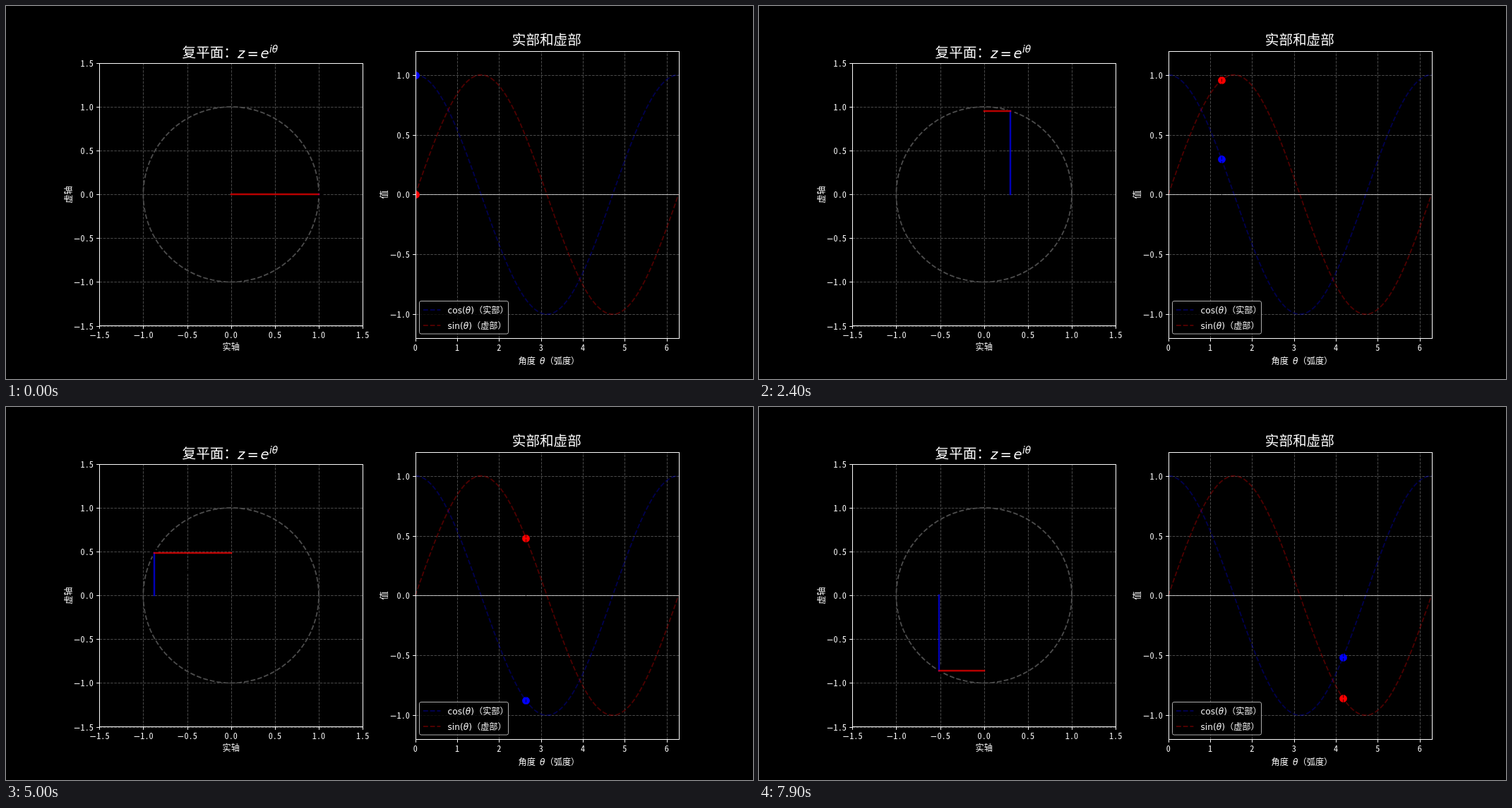
These frames come from a looping animation (1058 px wide and 529 px high, 8 s). An HTML page:

```html
<!DOCTYPE html>
<html lang="zh-CN">
<head>
<meta charset="utf-8">
<title>复平面</title>
<style>
  html, body { margin: 0; height: 100%; overflow: hidden; background: #000; }
  svg { display: block; width: 100%; height: 100%; }
  text {
    font: 12.2px "Noto Sans Mono CJK SC", "Noto Sans CJK SC", "Noto Sans CJK JP", "Noto Sans CJK", monospace;
    fill: #fff; text-spacing-trim: space-all;
  }
  .title { font-size: 19.6px; }
  .math { font-family: "DejaVu Sans", sans-serif; }
  .var { font-family: "DejaVu Sans", sans-serif; font-style: italic; }
  .mid { text-anchor: middle; }
  .end { text-anchor: end; }
  path, line, rect { fill: none; }
  .curve { stroke-width: 1.84; stroke-dasharray: 6.8 2.94; }
  .cos { stroke: #00f; stroke-opacity: .3; }
  .sin { stroke: #f00; stroke-opacity: .3; }
  .grid { stroke: #4a4a4a; stroke-width: .98; stroke-dasharray: 3.63 1.57; }
  .frame { stroke: #fff; stroke-width: .98; }
  .leg { stroke-width: 2.45; stroke-opacity: .72; stroke-linecap: square; }
</style>
</head>
<body>
<svg viewBox="0 0 1058 529">
  <clipPath id="plotArea"><rect x="580" y="64" width="373" height="407"/></clipPath>
  <g id="back"></g>
  <g id="moving">
    <line id="vector" stroke="#000" stroke-width="2.45"/>
    <circle id="point" r="5.4"/>
    <line id="imagLine" class="leg" stroke="#00f"/>
    <line id="realLine" class="leg" stroke="#f00"/>
    <g clip-path="url(#plotArea)">
      <circle id="cosDot" r="5.4" fill="#00f"/>
      <circle id="sinDot" r="5.4" fill="#f00"/>
      <line id="cursor" y1="471" y2="64" stroke="#000" stroke-opacity=".7" stroke-dasharray="4.53 1.96"/>
    </g>
  </g>
  <g id="front"></g>
  <g id="labels">
    <text class="title" x="249.6" y="73.2">复平面：</text>
    <text class="title var" x="328" y="73.5">z</text>
    <text class="title math" x="341.5" y="73.5">=</text>
    <text class="title var" x="360.5" y="73.5">e</text>
    <text class="var" x="373" y="66" style="font-size:13.7px">iθ</text>
    <text class="title mid" x="765.8" y="55.2">实部和虚部</text>
    <text class="mid" x="318.7" y="488">实轴</text>
    <text x="725.6" y="507.8">角度 <tspan class="var">θ</tspan>（弧度）</text>
    <text class="mid" transform="translate(93 267.5) rotate(-90)">虚轴</text>
    <text class="mid" transform="translate(540 267.5) rotate(-90)">值</text>
  </g>
  <g id="legend">
    <rect x="585.5" y="418.5" width="126" height="46.5" rx="2.4" style="fill:#000;fill-opacity:.8" stroke="#ccc" stroke-opacity=".85"/>
    <path d="M591 431h24.4" class="curve cos"/>
    <path d="M591 453h24.4" class="curve sin"/>
    <text x="625.5" y="435.5"><tspan class="math">cos(</tspan><tspan class="var">θ</tspan><tspan class="math">)</tspan>（实部）</text>
    <text x="625.5" y="457.5"><tspan class="math">sin(</tspan><tspan class="var">θ</tspan><tspan class="math">)</tspan>（虚部）</text>
  </g>
</svg>
<script>
const TAU = 2 * Math.PI;
const $ = id => document.getElementById(id);
const [back, front, labels] = ["back", "front", "labels"].map($);
const snap = v => Math.round(v) + 0.5;

const plane = {
  left: 132.3, right: 505.1, top: 81, bottom: 453.3,
  x: v => 318.7 + v * 124.3, y: v => 267.2 - v * 124.2,
  xTicks: [-1.5, -1, -0.5, 0, 0.5, 1, 1.5], yTicks: [-1.5, -1, -0.5, 0, 0.5, 1, 1.5], xDigits: 1
};
const graph = {
  left: 579.7, right: 952.5, top: 63.8, bottom: 471,
  x: v => 579.7 + v * 372.8 / TAU, y: v => 267.4 - v * 169.7,
  xTicks: [0, 1, 2, 3, 4, 5, 6], yTicks: [-1, -0.5, 0, 0.5, 1], xDigits: 0
};

function set(node, attrs) {
  for (const key in attrs) node.setAttribute(key, attrs[key]);
  return node;
}

function add(parent, tag, attrs) {
  return parent.appendChild(set(document.createElementNS("http://www.w3.org/2000/svg", tag), attrs));
}

function tickLabel(value, digits, x, y, align) {
  const text = add(labels, "text", { x, y, class: align });
  if (value < 0) add(text, "tspan", { class: "math" }).textContent = "−";
  text.append(Math.abs(value).toFixed(digits));
}

function drawAxes(ax) {
  const left = snap(ax.left), right = snap(ax.right), top = snap(ax.top), bottom = snap(ax.bottom);
  for (const v of ax.xTicks) {
    const x = snap(ax.x(v));
    add(back, "path", { d: `M${x} ${bottom}V${top}`, class: "grid" });
    add(front, "path", { d: `M${x} ${bottom}v4.3`, class: "frame" });
    tickLabel(v, ax.xDigits, ax.x(v), bottom + 17.6, "mid");
  }
  for (const v of ax.yTicks) {
    const y = snap(ax.y(v));
    add(back, "path", { d: `M${left} ${y}H${right}`, class: "grid" });
    add(front, "path", { d: `M${left} ${y}h-4.3`, class: "frame" });
    tickLabel(v, 1, left - 8.6, y + 4.2, "end");
  }
  add(front, "rect", { x: left, y: top, width: right - left, height: bottom - top, class: "frame" });
}

function drawCurve(ax, fx, fy, attrs) {
  const points = Array.from({ length: 201 }, (_, i) => {
    const a = i * TAU / 200;
    return ax.x(fx(a)).toFixed(2) + " " + ax.y(fy(a)).toFixed(2);
  });
  add(back, "path", { d: "M" + points.join("L"), ...attrs });
}

drawAxes(plane);
drawAxes(graph);
drawCurve(plane, Math.cos, Math.sin, { class: "curve", stroke: "#4c4c4c" });
drawCurve(graph, a => a, Math.cos, { class: "curve cos" });
drawCurve(graph, a => a, Math.sin, { class: "curve sin" });
add(back, "path", { d: `M${graph.left} 267.5H${graph.right}`, stroke: "#fff", "stroke-width": 0.7 });

// The angle advances in 100 ms steps; 119 steps make a full turn.
function pose(ms) {
  const angle = Math.floor(ms / 100) % 80 * TAU / 119;
  const cos = Math.cos(angle), sin = Math.sin(angle);
  const x = plane.x(cos), y = plane.y(sin), x0 = plane.x(0), y0 = plane.y(0);
  set($("vector"), { x1: x0, y1: y0, x2: x, y2: y });
  set($("point"), { cx: snap(x), cy: snap(y) });

  // Axis-parallel lines sit on whole pixels.
  const [px, py, px0, py0] = [x, y, x0, y0].map(Math.round);
  set($("imagLine"), { x1: px, y1: py0, x2: px, y2: py });
  set($("realLine"), { x1: px0, y1: py, x2: px, y2: py });

  const gx = snap(graph.x(angle));
  set($("cosDot"), { cx: gx, cy: snap(graph.y(cos)) });
  set($("sinDot"), { cx: gx, cy: snap(graph.y(sin)) });
  set($("cursor"), { x1: gx, x2: gx });
}

const start = performance.now();
function tick() {
  pose(performance.now() - start);
  requestAnimationFrame(tick);
}
tick();
</script>
</body>
</html>
```
